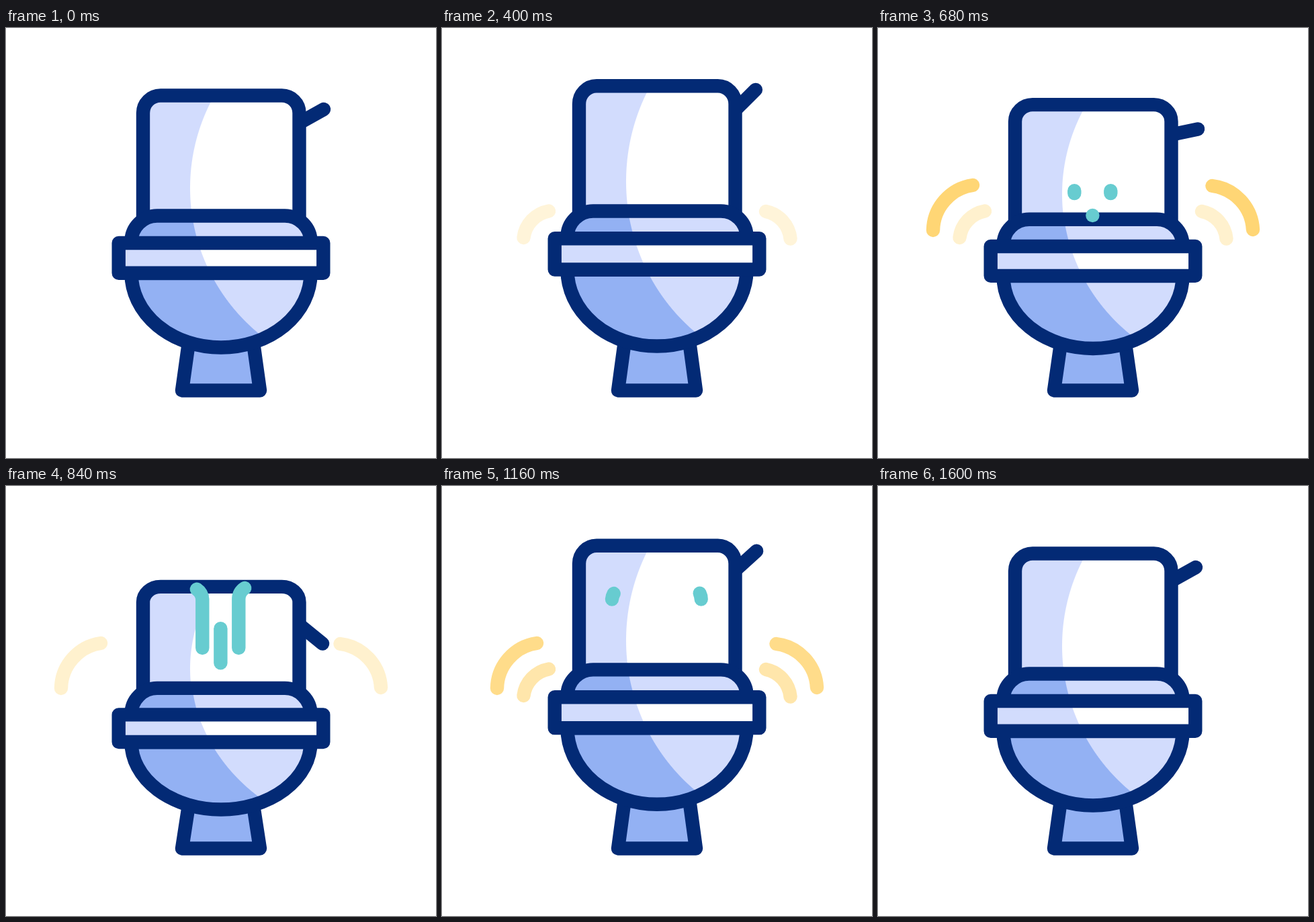
Recreate the animation shown at these times as an HTML page. Size 640 by 640 pixels, loop 1.84 s.

```html
<!DOCTYPE html>
<html lang="en">
<head>
<meta charset="utf-8">
<title>Flushing toilet</title>
<style>
  html, body { margin: 0; width: 100%; height: 100%; overflow: hidden; background: #fff; }
  svg { display: block; width: 640px; height: 640px; }
  path, rect { stroke-width: 20.4; stroke-linecap: round; stroke-linejoin: round; }
  #toilet path, #toilet rect { stroke: #032a75; vector-effect: non-scaling-stroke; }
  .wave { fill: none; stroke: #ffd675; }
  .jet { fill: none; stroke: #67ccd0; }
</style>
</head>
<body>
<svg viewBox="0 0 640 640">
  <defs>
    <radialGradient id="pale" gradientUnits="userSpaceOnUse" cx="555" cy="238" r="400">
      <stop offset=".7012" stop-color="#fff"/>
      <stop offset=".7038" stop-color="#d2dcfd"/>
    </radialGradient>
    <radialGradient id="deep" gradientUnits="userSpaceOnUse" cx="555" cy="238" r="400">
      <stop offset=".7012" stop-color="#d2dcfd"/>
      <stop offset=".7038" stop-color="#93b1f3"/>
    </radialGradient>
  </defs>

  <g id="toilet">
    <path id="handle"/>
    <path id="tank" fill="url(#pale)" d="M204 290V126.500A26 26 0 0 1 230 100.500H410.500A26 26 0 0 1 436.500 126.500V290Z"/>
    <g class="base">
      <path fill="#93b1f3" d="M271 475L262 539.500H378L369 475"/>
      <path fill="url(#deep)" d="M186.500 365A133.500 110.500 0 0 0 453.500 365Z"/>
    </g>
    <path id="lid" fill="url(#deep)" d="M186.500 330V318A38.500 38.500 0 0 1 225 279.500H415A38.500 38.500 0 0 1 453.500 318V330Z"/>
    <rect class="base" fill="url(#pale)" x="167.700" y="320" width="304.600" height="44.800"/>
  </g>

  <g class="wave" id="inner">
    <path d="M121.500 312A46 46 0 0 1 159 272.500"/>
    <path d="M518.500 313.500A46 46 0 0 0 482 273"/>
  </g>
  <g class="wave" id="outer">
    <path d="M82 301A69 69 0 0 1 141 234"/>
    <path d="M558 300A69 69 0 0 0 497.500 235"/>
  </g>

  <path class="jet" d="M292.300 246V168.500A19.700 19.700 0 0 0 253 168.500"/>
  <path class="jet" d="M346.300 246V168.500A19.700 19.700 0 0 1 385.700 168.500"/>
  <path class="jet" d="M319.400 279V175.500"/>
</svg>
<script>
  const LOOP = 1840, STEP = 40, FLOOR = 539.5, SEAT = 320;
  const $ = id => document.getElementById(id);
  const clamp = x => Math.min(1, Math.max(0, x));
  const ramp = (t, a, b) => clamp((t - a) / (b - a));
  const ease = (t, a, b) => { const x = ramp(t, a, b); return x * x * (3 - 2 * x); };

  // height factor: up, squashed, up again, back to rest
  const stretch = (t, high, low) => 1
    + (high - 1) * (ease(t, 200, 490) - ease(t, 1220, 1600))
    + (low - high) * (ease(t, 490, 900) - ease(t, 900, 1220));
  const scaleUp = (el, s) =>
    el.setAttribute('transform', `translate(0 ${FLOOR * (1 - s)}) scale(1 ${s})`);

  // each wave fades in and out twice
  const FADE = 145, PERIOD = 517;
  const pulse = (t, on, off) => ramp(t, on, on + FADE) - ramp(t, off, off + FADE);
  const glow = (t, lag) =>
    pulse(t, 360 + lag, 586 + lag) + pulse(t, 360 + lag + PERIOD, 586 + lag + PERIOD);

  const bases = document.querySelectorAll('.base');
  const jets = [...document.querySelectorAll('.jet')].map((el, i) => ({
    el, len: el.getTotalLength(),
    head: [i < 2 ? 650 : 676, 950],
    tail: i < 2 ? [790, 1230] : [740, 1148]
  }));

  function drawJet({ el, len, head, tail }, t) {
    const front = ease(t, ...head), back = ease(t, ...tail);
    const shown = front > back;
    el.style.display = shown ? '' : 'none';
    if (!shown) return;
    el.setAttribute('stroke-dasharray', `${(front - back) * len} ${len * 2}`);
    el.setAttribute('stroke-dashoffset', -back * len);
  }

  function draw(t) {
    const tank = stretch(t, 1.042, 0.878), base = stretch(t, 1.0395, 0.899);
    scaleUp($('tank'), tank);
    bases.forEach(el => scaleUp(el, base));
    // the lid rides on the seat without being squashed
    $('lid').setAttribute('transform', `translate(0 ${(FLOOR - SEAT) * (1 - base) * 1.05})`);

    const u = 1 - tank;
    const x = 473 + 143 * u - 1420 * u * u;
    const y = 121 + 925 * u + 750 * u * u;
    $('handle').setAttribute('d', `M421 ${FLOOR - 389.5 * tank}L${x} ${y}`);

    $('inner').setAttribute('opacity', glow(t, 0));
    $('outer').setAttribute('opacity', glow(t, 160));
    jets.forEach(j => drawJet(j, t));
  }

  const start = performance.now();
  function tick(now) {
    const t = Math.max(0, now - start) % LOOP;
    draw(Math.floor(t / STEP) * STEP);
    requestAnimationFrame(tick);
  }
  draw(0);
  requestAnimationFrame(tick);
</script>
</body>
</html>
```
